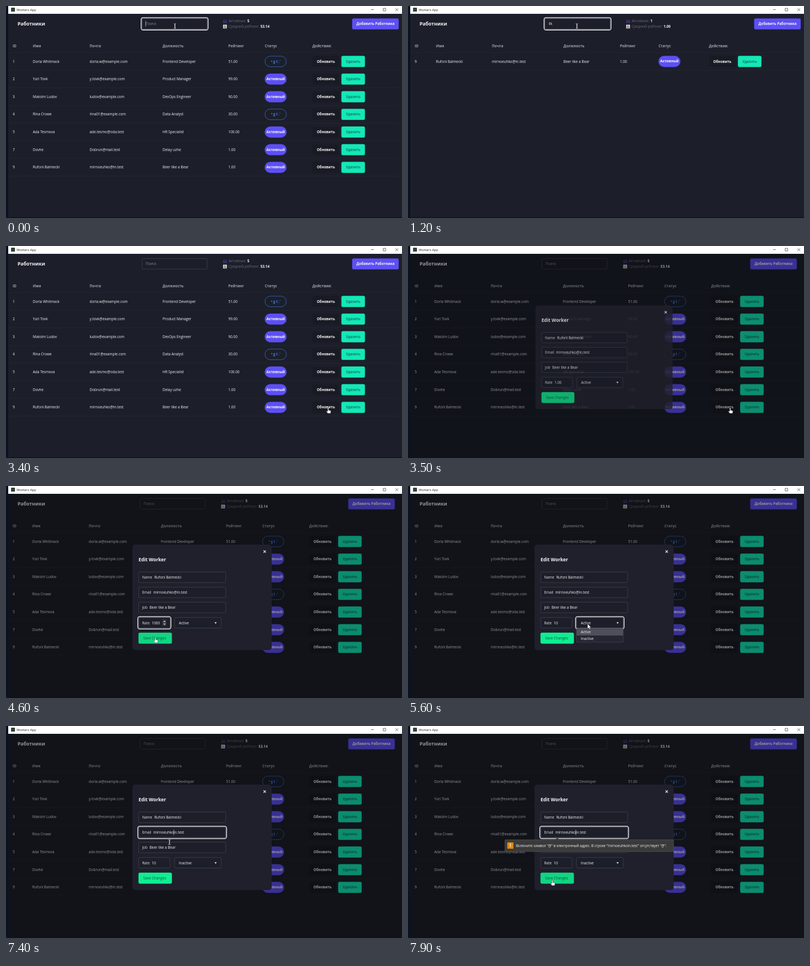
These frames come from a looping animation (708 px wide and 380 px high, 8000 ms). An HTML page:

```html
<!DOCTYPE html>
<html lang="ru">
<head>
<meta charset="utf-8">
<title>Workers App</title>
<style>
html, body { margin: 0; width: 100%; height: 100%; overflow: hidden; background: #0a1224; }
svg { display: block; width: 708px; height: 380px; }
text { font-family: "Open Sans", "Noto Sans", sans-serif; white-space: pre; }
</style>
</head>
<body>
<svg id="stage" viewBox="0 0 708 380"></svg>
<script>
const LOOP = 8000;
const FONT = '"Open Sans", "Noto Sans", sans-serif';
const BG = '#1c1f2a', LINE = '#454750', WHITE = '#f4f4f6';
const stage = document.getElementById('stage');
const pen = document.createElement('canvas').getContext('2d');

const workers = [
  [1, 'Dorla Whitmack', 'dorla.w@example.com', 'Frontend Developer', 51, false],
  [2, 'Yuri Tovk', 'y.tovk@example.com', 'Product Manager', 99, true],
  [3, 'Maksim Ludov', 'ludov@example.com', 'DevOps Engineer', 90, true],
  [4, 'Rina Crowe', 'rina01@example.com', 'Data Analyst', 30, false],
  [5, 'Ada Tesmova', 'ade.tesmo@oda.test', 'HR Specialist', 100, true],
  [7, 'Dovhe', 'Dobrun@mail.test', 'Delay uzhe', 1, true],
  [9, 'Rufoni Balmecki', 'mirnoeuhko@in.test', 'Beer like a Bear', 1, true]
];
const heads = ['ID', 'Имя', 'Почта', 'Должность', 'Рейтинг', 'Статус', 'Действия:'];

// Column and header positions for each page width
const layouts = {
  full: { cols: [12, 48, 149.5, 280, 397.5, 462.7, 547.8], search: 243, stats: 388, add: 619 },
  few: { cols: [12, 50, 150, 278, 379, 448, 538], search: 244.7, stats: 390, add: 619 },
  modal: { cols: [12, 47, 148, 277, 393.5, 458.3, 542], search: 239.3, stats: 384.7, add: 612 }
};

const queries = [[0, ''], [580, 'l'], [640, 'li'], [690, 'lik'], [1560, 'li'], [1660, 'l'], [1760, '']];
const rates = [[0, '1.00'], [3860, '1.0'], [3900, '1.'], [3940, '1'], [4020, '10'], [4060, '100'], [4090, '1000'],
  [4960, '100'], [5060, '10']];
const focuses = [[0, 'search'], [2460, ''], [3820, 'rate'], [5560, 'select'], [6960, 'email']];
const keys = [-130, 580, 640, 690, 1560, 1660, 1760, 3820, 3940, 4090, 4660, 4960, 5060, 6960, 7160, 7660];
const path = [[0, 302, 36], [1900, 302, 36], [2500, 420, 50], [3200, 576, 290], [3550, 576, 290], [3820, 274, 247],
  [4180, 274, 247], [4550, 267, 271], [4900, 267, 271], [5380, 321, 247], [5750, 321, 247], [6150, 323, 270],
  [6350, 323, 270], [6580, 320.5, 217], [6720, 320.5, 217], [6960, 301, 191], [7300, 301, 191],
  [7650, 258, 276], [LOOP, 258, 276]];

const MODAL_AT = 3440, FADE = 180;
const PICKED = 6350, SAVED = 4660, RESAVED = 7660;
const boxes = {
  name: [237, 154, 156, 19.4], email: [237, 181, 156, 19.4], job: [237, 208, 156, 19.4],
  rate: [237, 235.5, 56.5, 19.4], select: [301, 235.5, 84, 19.4], save: [237, 263, 59.5, 19.5]
};

const at = (list, t) => list.filter(s => s[0] <= t).pop()[1];
const inside = ([x, y, w, h], px, py) => px >= x && px <= x + w && py >= y && py <= y + h;
const rect = (x, y, w, h, fill, r = 0, more = '') =>
  `<rect x="${x}" y="${y}" width="${w}" height="${h}" rx="${r}" fill="${fill}" ${more}/>`;
const line = (d, color, w = 1) => `<path d="${d}" fill="none" stroke="${color}" stroke-width="${w}"/>`;
const text = (x, y, s, { size = 6.4, weight = 500, fill = WHITE, anchor = 'start' } = {}) =>
  `<text x="${x}" y="${y + size * 0.36}" font-size="${size}" font-weight="${weight}" fill="${fill}" text-anchor="${anchor}">${s}</text>`;
const label = (x, y, s, fill, size = 6.2, weight = 700) => text(x, y, s, { size, weight, fill, anchor: 'middle' });
const button = (x, y, w, h, fill, r = 2.5) =>
  rect(x, y, w, h, fill, r, `stroke="${fill}" stroke-opacity=".35" stroke-width=".9"`);

function widthOf(s, size = 6.4) {
  pen.font = `500 64px ${FONT}`;
  return pen.measureText(s).width * size / 64;
}

function caretOn(t) {
  const last = keys.filter(k => k <= t).pop();
  return (t - last) % 1000 < 500;
}

function caret(x, y) {
  return line(`M${x} ${y - 5}v10`, WHITE, 0.6);
}

function field([x, y, w, h], focused) {
  const ring = focused
    ? rect(x - 1.4, y - 1.4, w + 2.8, h + 2.8, 'none', 3.5, `stroke="${WHITE}" stroke-width="1.3"`) : '';
  return ring + rect(x + 0.25, y + 0.25, w - 0.5, h - 0.5, BG, 2, `stroke="${focused ? '#777983' : LINE}" stroke-width=".7"`);
}

function titleBar() {
  return rect(4, 0, 704, 14, '#fff') + rect(9, 3, 7, 7, '#33423b', 0.5) +
    text(19, 6.7, 'Workers App', { size: 5.8, fill: '#222', weight: 400 }) +
    line('M652.5 6.5h5M674.3 4.2h4.6v4.6h-4.6zM696.3 4.2l4.8 4.8m0-4.8l-4.8 4.8', '#333', 0.7);
}

function statIcons(x) {
  const people = [1.7, 5.3].map(dx =>
    `<circle cx="${x + dx}" cy="26" r="1.3" fill="#423579"/>` + rect(x + dx - 1.6, 27.6, 3.2, 3, '#423579', 1)).join('');
  return people + rect(x, 33.5, 7, 6.8, '#d3d5d8', 0.4) + rect(x + 1, 35.8, 1.3, 3.7, '#56a46c') +
    rect(x + 2.9, 34.5, 1.3, 5, '#b35a5a') + rect(x + 4.8, 37, 1.3, 2.5, '#477fc0');
}

function header(L, rows, query, focused, blink) {
  const sx = L.search, active = rows.filter(r => r[5]).length;
  const mean = rows.reduce((sum, r) => sum + r[4], 0) / rows.length;
  const stat = (y, name, value) => text(L.stats + 10, y,
    `${name} <tspan font-weight="700" fill="${WHITE}">${value}</tspan>`, { fill: '#656775', size: 6.3 });
  return text(20.7, 32, 'Работники', { size: 8.6, weight: 700 }) +
    field([sx, 22.2, 117, 19.4], focused) +
    text(sx + 6.8, 32, query || 'Поиск', { fill: query ? WHITE : '#85868f' }) +
    (focused && blink ? caret(sx + 6.8 + widthOf(query), 32) : '') +
    statIcons(L.stats) + stat(27.2, 'Активные:', active) + stat(36.8, 'Средний рейтинг:', mean.toFixed(2)) +
    button(L.add, 22.4, 83, 19.4, '#5d4ff5') + label(L.add + 41.7, 32.2, 'Добавить Работника', WHITE);
}

function tableRow(row, i, c) {
  const y = 99.3 + i * 31.63, top = y - 9.7;
  const cells = [row[0], row[1], row[2], row[3], row[4].toFixed(2)];
  const pill = row[5]
    ? button(c[5], top, 38.8, 19.6, '#5d4ff5', 9.8) + label(c[5] + 19.4, y, 'Активный', WHITE, 6.1)
    : rect(c[5] + 0.3, top + 0.3, 38.2, 19, 'none', 9.5, 'stroke="#346bc9" stroke-width=".8"') +
      label(c[5] + 19.6, y, "• g t .'", '#3d7be8', 6.2);
  return cells.map((s, k) => text(c[k], y, s)).join('') + pill +
    rect(c[6], top, 48, 19.6, '#191b24', 2) + label(c[6] + 24, y, 'Обновить', WHITE) +
    button(c[6] + 52, top, 41.8, 19.6, '#14e8b7') + label(c[6] + 73, y, 'Удалить', '#0b6a5a', 6.2, 600) +
    line(`M4 ${y + 15.8}H701`, '#ffffff0c', 0.7);
}

function page(t, query, focus, open) {
  const rows = workers.filter(r => (r[1] + ' ' + r[3]).toLowerCase().includes(query));
  const L = open ? layouts.modal : rows.length < 3 ? layouts.few : layouts.full;
  return rect(4, 14, 704, 364.6, BG) + header(L, rows, query, focus === 'search', caretOn(t)) +
    heads.map((s, k) => text(L.cols[k], 72, s, { weight: 700, fill: '#a0a1a9' })).join('') +
    line('M4 83.4H701', '#ffffff0c', 0.7) +
    rows.map((r, i) => tableRow(r, i, L.cols)).join('');
}

function tip(x, y, w, message) {
  return rect(x + 0.3, y, w, 21, '#3a3a3b', 1, 'stroke="#626264" stroke-width=".6"') +
    `<path d="M262 ${y + 0.4}l5-4 5 4z" fill="#3a3a3b"/>` +
    rect(x + 4.5, y + 4.5, 11, 11.5, '#e08a12', 1) + label(x + 10, y + 10.2, '!', '#fff', 8) +
    text(x + 20, y + 10.7, message, { size: 6.2 });
}

function modal(t, focus, hover) {
  const p = 1 - Math.pow(1 - Math.min(1, (t - MODAL_AT) / FADE), 4);
  const [, name, address, job] = workers[6];
  const cut = t >= 7160;
  const email = cut ? address.replace('@', '') : address;
  const values = { name, email, job, rate: at(rates, t) };
  const titles = { name: 'Name', email: 'Email', job: 'Job', rate: 'Rate' };
  const blink = caretOn(t);
  let out = rect(226, 105, 249, 189, '#1f202b', 5) +
    text(237, 132, 'Edit Worker', { size: 8.4, weight: 700 }) +
    line('M460.4 115.4l4.2 4.2m0-4.2l-4.2 4.2', WHITE, 1.1);
  for (const id in titles) {
    const b = boxes[id], y = b[1] + 9.7, x = 243.4 + widthOf(titles[id]) + 3.8;
    out += field(b, focus === id) + text(243.4, y, titles[id], { fill: '#e4e4e8' }) + text(x, y, values[id]);
    const typed = id === 'email' ? email.slice(0, address.indexOf('@') + (cut ? 0 : 1)) : values[id];
    if (focus === id && blink) out += caret(x + widthOf(typed), y);
  }
  if (focus === 'rate') {
    out += rect(279.5, 239.5, 7.5, 11.5, '#34353c', 0.5) +
      '<path d="M281 244l2.3-3 2.3 3zM281 246.5l2.3 3 2.3-3z" fill="#b7b7ba"/>';
  }
  const [sx, sy, sw, sh] = boxes.save;
  out += field(boxes.select, focus === 'select') +
    text(309, 245.2, t < PICKED ? 'Active' : 'Inactive') +
    '<path d="M372.8 244.2h4l-2 2.8z" fill="#f1f1f4"/>' +
    button(sx, sy, sw, sh, hover || p < 0.99 ? '#10d582' : '#10ec91') +
    text(245.3, 272.7, 'Save Changes', { fill: '#0b5a40' });
  if (focus === 'select' && t < PICKED) {
    const second = t >= 6000;
    out += rect(301, 256, 84, 24, '#252631', 1, 'stroke="#555762" stroke-width=".5"') +
      rect(301.4, second ? 268 : 256.4, 83.2, 11.6, '#4d4f5b') +
      text(309, 262, 'Active') + text(309, 274, 'Inactive');
  }
  if (t >= SAVED && t < 4960) out += tip(187, 259, 172, 'Значение должно быть меньше или равно 100.');
  if (t >= RESAVED) out += tip(173, 204, 301.5, `Включите символ "@" в электронный адрес. В строке "${email}" отсутствует "@".`);
  return rect(4, 14, 704, 364.6, '#000', 0, `opacity="${0.4 * Math.min(1, p * 1.2)}"`) +
    `<g opacity="${p}" transform="translate(350.5 199.5) scale(${0.92 + 0.08 * p}) translate(-350.5 -199.5)">${out}</g>`;
}

function pointer(t) {
  const i = Math.max(1, path.findIndex(s => s[0] > t));
  const [t0, x0, y0] = path[i - 1], [t1, x1, y1] = path[i];
  const u = (t - t0) / (t1 - t0), e = u * u * (3 - 2 * u);
  return [x0 + (x1 - x0) * e, y0 + (y1 - y0) * e];
}

function cursorKind(x, y, open) {
  if (open) {
    if (!inside([226, 105, 249, 189], x, y) || inside(boxes.save, x, y)) return 'hand';
    return ['name', 'email', 'job', 'rate'].some(id => inside(boxes[id], x, y)) ? 'beam' : 'arrow';
  }
  if (inside([243, 22, 119, 20], x, y)) return 'beam';
  return x > 548 && x < 642 && y > 89 && (y - 89.5) % 31.63 < 19.6 ? 'hand' : 'arrow';
}

const cursors = {
  beam: line('M-2-4.3q2 0 2 1v6.6q0 1-2 1M2-4.3q-2 0-2 1v6.6q0 1 2 1', '#e8e8ea', 0.8),
  hand: '<path d="M-.9.8Q-.9-.2 0-.2T.9.8V4.4l3 .7Q5 5.4 4.9 6.6L4.2 10H-.6L-3.2 6.7Q-3.4 5.6-2.2 5.8L-.9 6.8z" fill="#fff" stroke="#222" stroke-width=".5"/>',
  arrow: '<path d="M0 0V9l2.1-2 1.5 3.3 1.4-.6L3.6 6.4H6.3z" fill="#fff" stroke="#222" stroke-width=".5"/>'
};

function render(t) {
  const open = t >= MODAL_AT, focus = at(focuses, t);
  const [x, y] = pointer(t);
  stage.innerHTML = rect(0, 0, 708, 380, '#0a1224') + page(t, at(queries, t), focus, open) +
    (open ? modal(t, focus, inside(boxes.save, x, y)) : '') + titleBar() +
    `<g transform="translate(${x} ${y})">${cursors[cursorKind(x, y, open)]}</g>`;
}

const start = performance.now();
function tick() {
  render(Math.max(0, performance.now() - start) % LOOP);
  requestAnimationFrame(tick);
}
tick();
</script>
</body>
</html>
```
